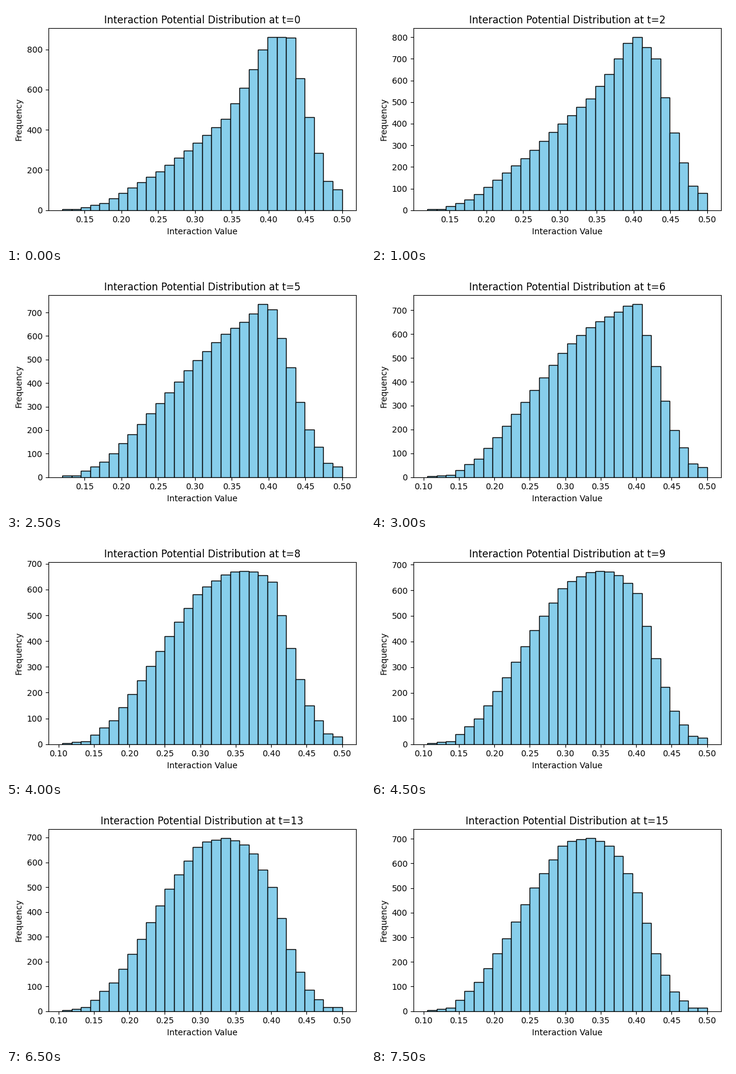
A matplotlib script for the animation above (8 s loop, 600 by 400 pixels).

```python
import numpy as np
import matplotlib.pyplot as plt
from matplotlib.animation import FuncAnimation

STEPS = 16
BINS = 30
NARROW = np.linspace(0.1198, 0.5, BINS + 1)
WIDE = np.linspace(0.1055, 0.5, BINS + 1)
UNIT = NARROW[1] - NARROW[0]

# Key points of the outline, in counts per narrow bin.
KNOTS = [0.10, 0.14, 0.18, 0.22, 0.26, 0.30, 0.34, 0.37, 0.40, 0.43, 0.45, 0.47, 0.485, 0.50]
SKEWED = np.array([2, 5, 38, 122, 208, 325, 445, 628, 860, 864, 543, 260, 105, 100])
MIDDLE = np.array([2, 8, 71, 200, 338, 487, 605, 665, 760, 470, 235, 118, 38, 50])
SETTLED = np.array([0, 15, 118, 298, 500, 662, 679, 635, 478, 205, 88, 32, 6, 18])


def progress(step):
    """0 = skewed, 1 = middle, 2 = settled; late on it moves every other step."""
    if step >= 12:
        step -= step % 2
    return np.interp(step, [0, 5, 8, 11, 14], [0, 1, 1.5, 1.92, 2])


def outline(p):
    if p <= 1:
        return SKEWED + (MIDDLE - SKEWED) * p
    return MIDDLE + (SETTLED - MIDDLE) * (p - 1)


def histogram(step):
    edges = NARROW if step <= 5 else WIDE
    centres = (edges[:-1] + edges[1:]) / 2
    heights = np.interp(centres, KNOTS, outline(progress(step)))
    return edges, centres, np.round(heights * (edges[1] - edges[0]) / UNIT)


fig, ax = plt.subplots(figsize=(6, 4), dpi=100)


def draw(step):
    edges, centres, counts = histogram(step)
    ax.clear()
    ax.hist(centres, bins=edges, weights=counts, color="skyblue", edgecolor="black")
    ax.set_title(f"Interaction Potential Distribution at t={step}")
    ax.set_xlabel("Interaction Value")
    ax.set_ylabel("Frequency")
    return ax.patches


draw(0)
fig.tight_layout()

anim = FuncAnimation(fig, draw, frames=STEPS, interval=500, repeat=True, repeat_delay=0)
plt.show()
```
